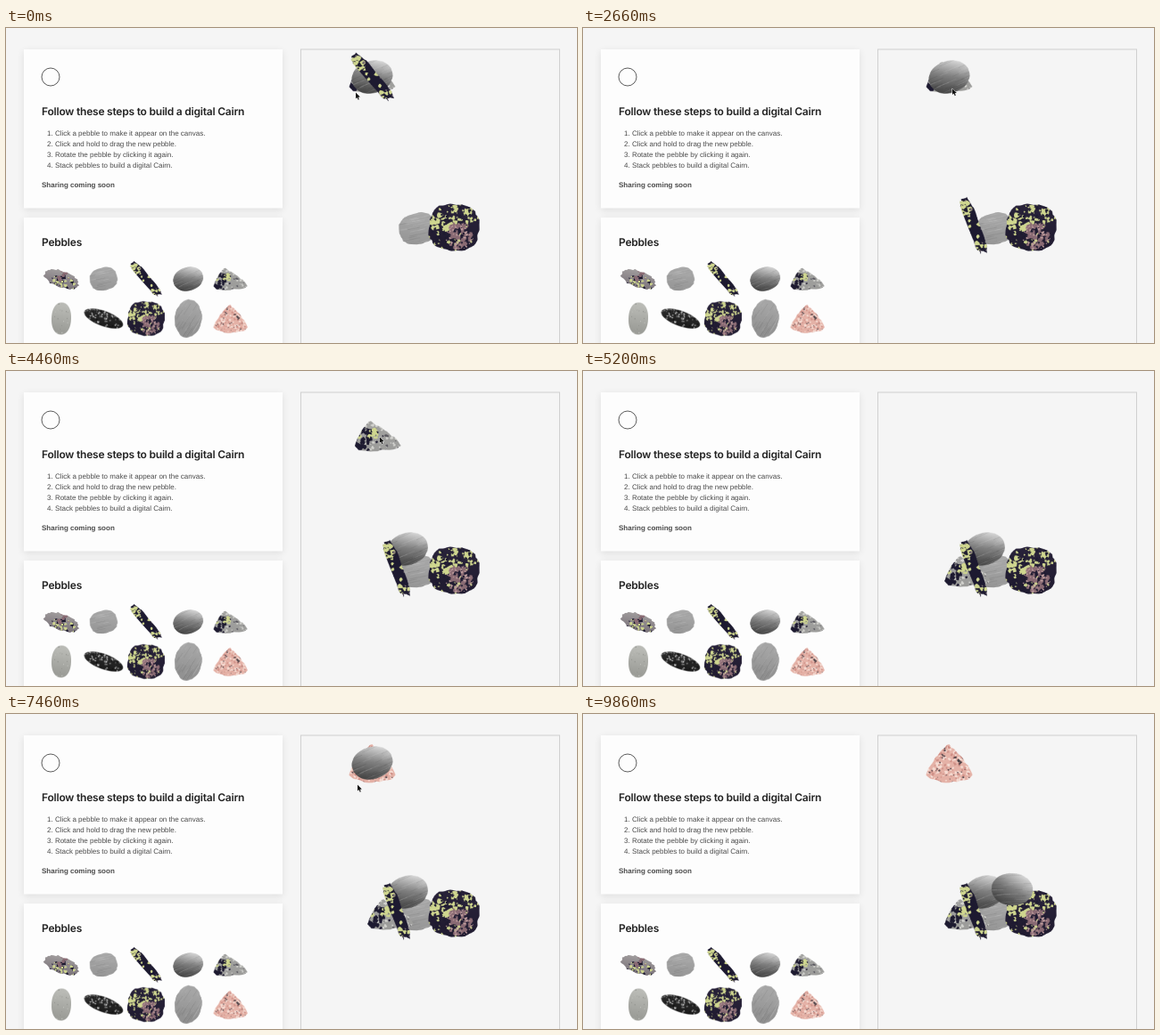
These frames come from a looping animation (640x354 px, 9.93 s). An HTML page with a canvas:

```html
<!DOCTYPE html>
<html lang="en">
<head>
<meta charset="utf-8">
<title>Build a digital Cairn</title>
<style>
  html, body { margin: 0; width: 100%; height: 100%; overflow: hidden; background: #f5f5f5; }
  canvas, svg { position: absolute; left: 0; top: 0; width: 640px; height: 354px; }
  text { font: 8px "Liberation Sans", Arial, sans-serif; fill: #4a4a4a; text-rendering: geometricPrecision; }
  .title { font: 600 12px Inter, sans-serif; letter-spacing: -.018em; fill: #222; }
  .note { font-weight: 700; }
</style>
</head>
<body>
<canvas id="stage"></canvas>
<svg viewBox="0 0 640 354">
  <text class="title" x="40" y="98.4">Follow these steps to build a digital Cairn</text>
  <text x="46" y="121.3">1. Click a pebble to make it appear on the canvas.</text>
  <text x="46" y="133.3">2. Click and hold to drag the new pebble.</text>
  <text x="46" y="145.3">3. Rotate the pebble by clicking it again.</text>
  <text x="46" y="157.3">4. Stack pebbles to build a digital Cairn.</text>
  <text class="note" x="40" y="179.2">Sharing coming soon</text>
  <text class="title" x="40" y="245.2">Pebbles</text>
</svg>
<script>
const LOOP = 9930, ZOOM = 1.36, DETAIL = 4, HALF = 26, TURN = Math.PI / 9;
const NAVY = '#1d1a30', LIME = '#cfd68f', MAUVE = '#8a6b74', ROSE = '#c2a0a0', ASH = '#a4a4a2';

const stage = document.getElementById('stage');
const ctx = stage.getContext('2d');
const dpr = window.devicePixelRatio || 1;
stage.width = 640 * dpr;
stage.height = 354 * dpr;

function seeded(seed) {
  return () => {
    seed = (seed + 0x6d2b79f5) | 0;
    let n = Math.imul(seed ^ (seed >>> 15), 1 | seed);
    n = (n + Math.imul(n ^ (n >>> 7), 61 | n)) ^ n;
    return ((n ^ (n >>> 14)) >>> 0) / 4294967296;
  };
}

// Superellipse; a higher power is boxier, rough jitters the rim.
function round(rx, ry, tilt = 0, power = 2, rough = 0) {
  const bend = v => Math.sign(v) * Math.abs(v) ** (2 / power);
  return rnd => Array.from({ length: 40 }, (_, i) => {
    const a = i * Math.PI / 20, k = 1 + rough * (rnd() - .5);
    const x = k * rx * bend(Math.cos(a)), y = k * ry * bend(Math.sin(a));
    return [x * Math.cos(tilt) - y * Math.sin(tilt), x * Math.sin(tilt) + y * Math.cos(tilt)];
  });
}

// Uneven hill on a nearly flat base.
function mound(w, h, peak) {
  return rnd => Array.from({ length: 32 }, (_, i) => {
    const x = i < 20 ? -w + i * w / 10 : w - (i - 20) * w / 6;
    const climb = x < peak ? (x + w) / (peak + w) : (w - x) / (w - peak);
    const y = i < 20 ? h * .6 - h * 1.6 * climb ** .75 : h * (.6 + .4 * climb ** .3);
    return [x, y + (rnd() - .5) * 1.6];
  });
}

// grains: [colour, count, size, centre x, centre y, spread]
const kinds = {
  wedge: {
    outline: round(20, 9, .35, 2.2, .2), tones: ['#aaa7a6', '#746c74'],
    grains: [[NAVY, 16, 2, 5, 5, 13], [LIME, 14, 1.6, 5, 5, 14], [MAUVE, 10, 1.5, 2, -2, 8], [LIME, 20, .9], [NAVY, 25, .9]]
  },
  slab: { outline: round(15.3, 12.6, -.25, 2.6, .05), tones: ['#a9a9a9', '#969696'], streaks: -.2 },
  stick: {
    outline: round(23.5, 5, .86, 4, .15), tones: [NAVY, NAVY],
    grains: [[LIME, 12, 2, -11, -13, 7], [LIME, 42, 1.5], ['#817479', 35, .9], [NAVY, 35, .8]]
  },
  cobble: { outline: round(17, 13.2, -.3, 2.1, .02), tones: ['#d6d6d6', '#7e7e7e', '#474747'], streaks: -.4 },
  rock: {
    outline: mound(19, 12.5, -7), tones: [ASH, '#9b9b99'],
    grains: [['#d2d2ce', 70, 1], ['#5b5960', 60, .9], [NAVY, 28, 2.1, -12, 4, 9], [LIME, 15, 1.6, -8, -3, 9], [NAVY, 25, .8]]
  },
  egg: { outline: round(11, 18, .04, 2.2), tones: ['#b9bab5', '#9c9d98'], grains: [['#cacac5', 30, .5], ['#83847f', 30, .5]] },
  flint: { outline: round(23, 8.5, .35), tones: ['#303030', '#181818'], grains: [['#b8b8b8', 110, .9], ['#777', 80, .9], ['#111', 70, .9]] },
  lichen: {
    outline: round(20.5, 19.3, .1, 2.6, .08), tones: ['#282239', '#211c31'],
    grains: [[LIME, 18, 2.2, -11, -3, 9], [LIME, 12, 2.2, 7, -12, 9], [MAUVE, 36, 1.9, 4, 7, 10],
      [LIME, 45, 1.1], [ROSE, 40, .8, 4, 7, 11], [NAVY, 70, 1.1]]
  },
  shard: { outline: round(15.3, 21.6, .12, 1.9, .05), tones: ['#a5a5a5', '#929292'], streaks: -1 },
  coral: {
    outline: mound(19.2, 16, -1), tones: ['#e6b5aa', '#e4b0a5'],
    grains: [['#f5dcd3', 120, 1.2], ['#cf8f86', 90, 1], ['#5b4b50', 55, .7], ['#4a4146', 6, 1.2, 8, -4, 5]]
  }
};

function tracePath(g, pts) {
  g.beginPath();
  pts.forEach(p => g.lineTo(...p));
  g.closePath();
}

function paintBlob(g, rnd, x, y, r, colour) {
  const pts = Array.from({ length: 9 }, (_, i) => {
    const a = i * Math.PI * 2 / 9, d = r * (.5 + rnd() * .8);
    return [x + d * Math.cos(a), y + d * Math.sin(a)];
  });
  g.fillStyle = colour;
  tracePath(g, pts);
  g.fill();
}

function renderStone({ outline, tones, grains = [], streaks }, seed) {
  const rnd = seeded(seed), spread = () => (rnd() - .5) * 44;
  const sprite = document.createElement('canvas');
  sprite.width = sprite.height = HALF * 2 * DETAIL;
  const g = sprite.getContext('2d');
  g.scale(DETAIL, DETAIL);
  g.translate(HALF, HALF);
  tracePath(g, outline(rnd));
  g.clip();
  const shade = g.createLinearGradient(2, -14, -3, 13);
  tones.forEach((c, i) => shade.addColorStop(i / (tones.length - 1), c));
  g.fillStyle = shade;
  g.fillRect(-HALF, -HALF, HALF * 2, HALF * 2);
  for (const [colour, count, size, cx = 0, cy = 0, reach = 23] of grains) {
    for (let i = 0; i < count; i++) {
      const a = rnd() * Math.PI * 2, d = reach * Math.sqrt(rnd());
      paintBlob(g, rnd, cx + d * Math.cos(a), cy + d * Math.sin(a), size * (.6 + rnd() * .8), colour);
    }
  }
  if (streaks !== undefined) {
    g.rotate(streaks);
    for (let i = 0; i < 70; i++) {
      g.fillStyle = i % 2 ? 'rgba(255,255,255,.1)' : 'rgba(0,0,0,.09)';
      g.fillRect(spread(), spread(), 6 + rnd() * 12, .6);
    }
  }
  return sprite;
}

const names = Object.keys(kinds);
const sprites = {};
names.forEach((name, i) => { sprites[name] = renderStone(kinds[name], 41 + i * 17); });

// Bottom to top; drag is [start, end], click is when the stone turns once.
const SPAWN = [410.5, 55], GRIP = [2, 1];
const stack = [
  { kind: 'slab', home: [461.5, 225.5] },
  { kind: 'lichen', home: [502, 224] },
  { kind: 'rock', drop: [431, 225], drag: [4350, 4900] },
  { kind: 'cobble', drop: [450, 200], drag: [2950, 3450] },
  { kind: 'stick', drop: [438, 222], drag: [900, 1450], click: 1900 },
  { kind: 'coral', born: 6150 },
  { kind: 'cobble', drop: [481, 197], drag: [7800, 8850], click: 9050, born: 6650 }
];

// Sideways motion leads, vertical motion eases in and out.
function glide([x0, y0], [x1, y1], u) {
  u = Math.min(1, Math.max(0, u));
  return [x0 + (x1 - x0) * (1 - (1 - u) ** 1.6), y0 + (y1 - y0) * u * u * (3 - 2 * u)];
}

function placeOf({ home = SPAWN, drop, drag }, t) {
  return drop ? glide(home, drop, (t - drag[0]) / (drag[1] - drag[0])) : home;
}

// Each stop is [arrive, leave, point]; drags add a stop at both ends.
const gripped = p => p.map((v, i) => v + GRIP[i]);
const stops = [
  [0, 100, [392, 72.5]], [5950, 6200, [252, 325]], [6550, 6700, [204, 281]], [7350, 7500, [394, 79.5]],
  ...stack.filter(s => s.drag).flatMap(({ drop, drag: [start, end] }) => [
    [start - 150, start, gripped(SPAWN)], [end, end + 500, gripped(drop)]
  ])
].sort((a, b) => a[0] - b[0]);

function cursorAt(t) {
  const i = stops.findLastIndex(s => s[0] <= t), next = stops[i + 1];
  const [, leave, point] = stops[i];
  return next ? glide(point, next[2], (t - leave) / (next[0] - leave)) : point;
}
const cursorHidden = t => (t > 4950 && t < 5260) || t > 9250;

function drawStone(kind, x, y, scale = 1, angle = 0) {
  ctx.save();
  ctx.translate(x, y);
  ctx.rotate(angle);
  ctx.scale(scale, scale);
  ctx.drawImage(sprites[kind], -HALF, -HALF, HALF * 2, HALF * 2);
  ctx.restore();
}

function drawCard(y, h) {
  ctx.save();
  ctx.shadowColor = 'rgba(0,0,0,.09)';
  ctx.shadowBlur = 8 * dpr;
  ctx.shadowOffsetY = 2 * dpr;
  ctx.fillStyle = '#fdfdfd';
  ctx.fillRect(20, y, 290, h);
  ctx.restore();
}

function drawCursor(x, y) {
  ctx.save();
  ctx.translate(x, y);
  tracePath(ctx, [[0, 0], [0, 7], [1.6, 5.6], [2.7, 8.2], [3.8, 7.7], [2.8, 5.2], [4.9, 5.1]]);
  ctx.strokeStyle = '#fff';
  ctx.stroke();
  ctx.fillStyle = '#111';
  ctx.fill();
  ctx.restore();
}

function drawPage() {
  ctx.fillStyle = '#f5f5f5';
  ctx.fillRect(0, 0, 640, 354);
  drawCard(24, 178.5);
  drawCard(213, 160);
  ctx.lineWidth = 1;
  ctx.strokeStyle = '#d0d0d0';
  ctx.strokeRect(330.5, 24, 290, 360);
  ctx.strokeStyle = '#333';
  ctx.lineWidth = .8;
  ctx.beginPath();
  ctx.arc(50, 55, 10, 0, Math.PI * 2);
  ctx.stroke();
  ctx.lineWidth = 1;
  names.forEach((name, i) => drawStone(name, 62 + i % 5 * 47.4, i < 5 ? 282 : 326.5));
}

function render(t) {
  ctx.setTransform(dpr, 0, 0, dpr, 0, 0);
  ctx.imageSmoothingQuality = 'high';
  drawPage();
  for (const stone of stack) {
    if (t < (stone.born || 0)) continue;
    drawStone(stone.kind, ...placeOf(stone, t), ZOOM, t >= stone.click ? TURN : 0);
  }
  if (!cursorHidden(t)) drawCursor(...cursorAt(t));
}

const start = performance.now();
function tick() {
  render((performance.now() - start) % LOOP);
  requestAnimationFrame(tick);
}
tick();
</script>
</body>
</html>
```
